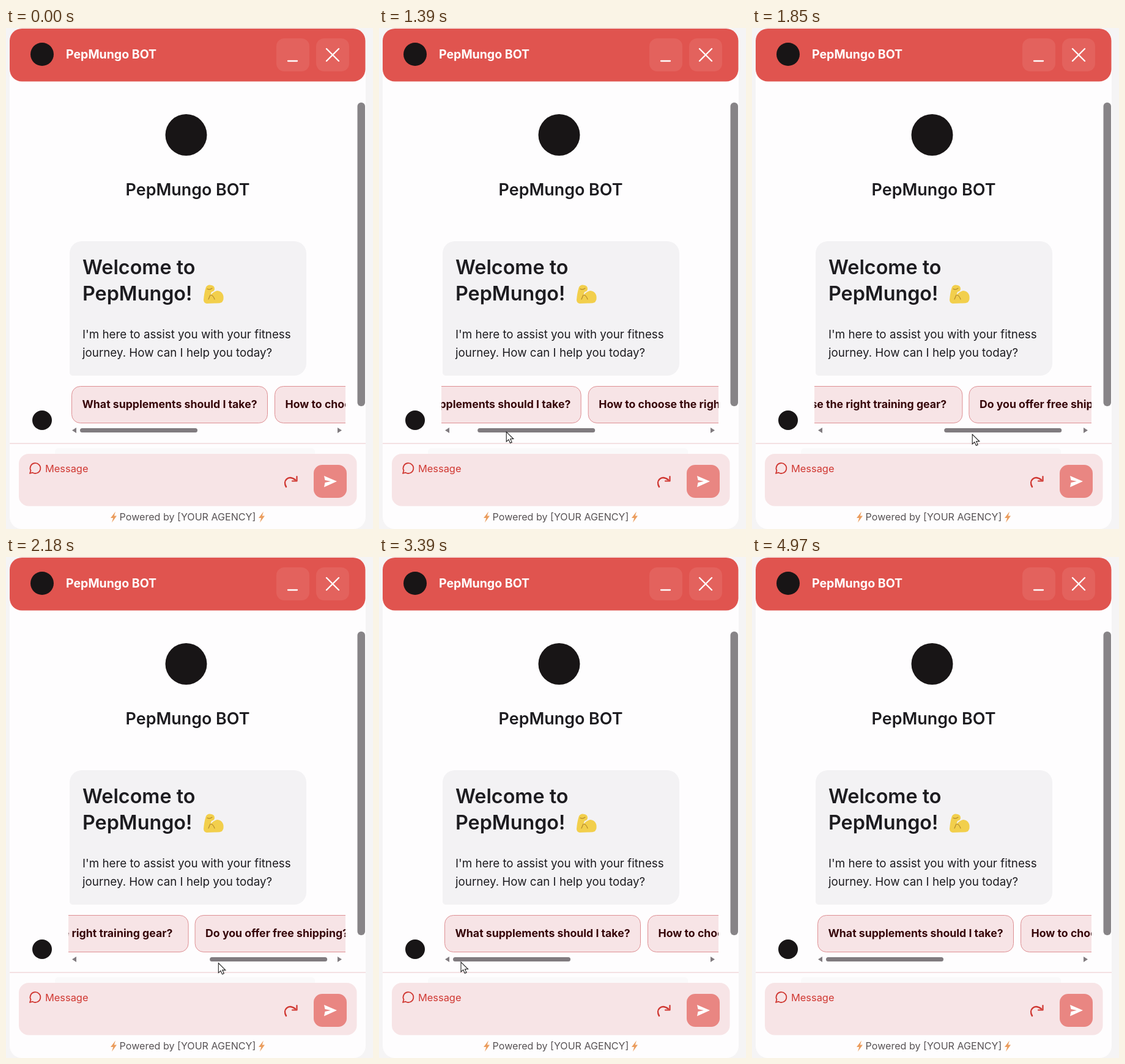
Write an HTML page that moves like this. It is 600 px wide and 820 px high and loops after 5000 ms.

```html
<!DOCTYPE html>
<html lang="en">
<head>
<meta charset="utf-8">
<title>Fitness chat widget</title>
<style>
  html, body { margin: 0; width: 100%; height: 100%; overflow: hidden; background: #f5f4f5; }
  svg { display: block; width: 600px; height: 820px; }
  text { font-family: Inter, "Open Sans", sans-serif; font-optical-sizing: none; fill: #1d1c20; }
  .bold { font-weight: 600; }
  .h1 { font-size: 32.3px; }
  .body { font-size: 18.77px; }
  .chip rect { fill: #f7e4e6; stroke: #de8f93; }
  .chip text { font-size: 17.7px; font-weight: 700; fill: #360609; }
  .line { fill: none; stroke-linecap: round; stroke-linejoin: round; }
  .red { stroke: #d03832; }
  .bar { fill: #807b7f; }
</style>
</head>
<body>
<svg viewBox="0 0 600 820">
  <defs>
    <clipPath id="view"><rect x="102" y="580" width="453" height="72"/></clipPath>
    <path id="bolt" d="M3 -9L-5 1.500H-.8L-3 9L5 -2H.8Z" fill="#eb9d5e"/>
  </defs>

  <rect x="6" y="1" width="582" height="819" rx="20" fill="#fefdfe"/>

  <!-- header -->
  <rect x="6" y="1" width="581.500" height="86.500" rx="20" fill="#e0544f"/>
  <circle cx="59" cy="43" r="19" fill="#181516"/>
  <text x="98" y="50" font-size="19.500" font-weight="700" style="fill:#fff">PepMungo BOT</text>
  <g fill="#e3625d">
    <rect x="442" y="17" width="54" height="54" rx="13"/>
    <rect x="507" y="17" width="54" height="54" rx="13"/>
  </g>
  <path class="line" d="M461 54H476M524 34L544 54M544 34L524 54" stroke="#fff" stroke-width="2.300"/>

  <!-- intro -->
  <circle cx="294.500" cy="175" r="34" fill="#181516"/>
  <text class="bold" x="297" y="274" font-size="26.900" text-anchor="middle">PepMungo BOT</text>
  <rect class="bar" x="574.500" y="122" width="12.500" height="497" rx="6" style="fill:#878487"/>

  <!-- welcome bubble -->
  <path d="M124 349H471A20 20 0 0 1 491 369V549A20 20 0 0 1 471 569H109A5 5 0 0 1 104 564V369A20 20 0 0 1 124 349Z" fill="#f3f2f4"/>
  <text class="bold h1" x="125" y="403">Welcome to</text>
  <text class="bold h1" x="125" y="446">PepMungo!</text>
  <path d="M327 424Q330 419 336 421Q341 422 341 427Q341 431 336 432L334 438Q338 432 345 430Q352 430 355 437Q357 444 353 449Q349 451 341 450.500L328 451Q323 450 323 445Q324 433 327 424Z" fill="#f2cf4c"/>
  <path class="line" d="M329 427Q333 429 337 426M334 437L331 444M335 437Q339 438 341 444" stroke="#b58a2c" stroke-width="1.200"/>
  <text class="body" x="125" y="508">I'm here to assist you with your fitness</text>
  <text class="body" x="125" y="538">journey. How can I help you today?</text>

  <!-- suggestions -->
  <circle cx="59" cy="642" r="16" fill="#181516"/>
  <g clip-path="url(#view)"><g id="chips"></g></g>
  <path class="bar" d="M108 658.500L115 654V663ZM549 658.500L542 654V663Z"/>
  <rect class="bar" id="thumb" x="121" y="655" width="192" height="7" rx="3.500"/>

  <!-- message box -->
  <path d="M6 680H588" stroke="#f0d8da" stroke-width="1.300"/>
  <rect x="80" y="688" width="425" height="12" rx="5" fill="#faf9fa"/>
  <rect x="21" y="697" width="552.500" height="85.500" rx="16" fill="#f7e4e6"/>
  <path class="line red" d="M39 729L40.500 724.500A8.400 8.400 0 1 1 43.500 727.700Z" stroke-width="1.800"/>
  <text x="64" y="727" font-size="16.400" style="fill:#d03832">Message</text>
  <path class="line red" d="M458 751C452 741 461 731 473 739.500" stroke-width="2.500"/>
  <path class="line red" d="M475.500 734V741.500H468" stroke-width="2.200"/>
  <rect x="503" y="715" width="54" height="54" rx="14" fill="#e98682"/>
  <path d="M520 733L541 742L520 751.500L521.500 744L531 742L521.500 740Z" fill="#fff"/>
  <use href="#bolt" x="176" y="800.500"/>
  <use href="#bolt" x="418" y="800.500"/>
  <text x="297" y="806" font-size="16.100" text-anchor="middle" style="fill:#585355">Powered by [YOUR AGENCY]</text>

  <path id="cursor" d="M0 0V16L3.700 12.600L6.200 18.300L9 17.100L6.500 11.500H11.500Z" fill="#fff" stroke="#222" stroke-width="1.100"/>
</svg>
<script>
const LOOP = 5000, SCROLL_RATIO = 2.42;
const $ = id => document.getElementById(id);

// left edge, width, label
$('chips').innerHTML = [
  [107.5, 320, 'What supplements should I take?'],
  [439.5, 372, 'How to choose the right training gear?'],
  [822.5, 270, 'Do you offer free shipping?']
].map(([x, w, label]) => `<g class="chip">
  <rect x="${x}" y="586.5" width="${w}" height="60" rx="14"/>
  <text x="${x + 17}" y="622">${label}</text></g>`).join('');

// [time, value] points
const thumbX = [[1120, 0], [1390, 40], [1850, 193], [2030, 223], [2130, 223], [2420, 58], [2640, 0]];
const cursorX = [[120, 185], [450, 152], [1090, 152], [1390, 208], [1850, 360], [2050, 388], [2420, 208], [2670, 134], [3850, 134], [4150, 118]];
const cursorY = [[120, 830], [450, 653], [1090, 653], [1390, 661], [1850, 665], [2420, 664], [2670, 663], [3850, 663], [4150, 830]];

// Smooth curve through the points, without overshoot
function curve(points, t) {
  const last = points.length - 1;
  if (t <= points[0][0]) return points[0][1];
  if (t >= points[last][0]) return points[last][1];
  const slope = i => (points[i + 1][1] - points[i][1]) / (points[i + 1][0] - points[i][0]);
  const tangent = i => {
    if (i === 0 || i === last) return 0;
    const a = slope(i - 1), b = slope(i);
    return a * b > 0 ? 2 * a * b / (a + b) : 0;
  };
  const i = points.findIndex(p => p[0] > t) - 1;
  const [t0, v0] = points[i], [t1, v1] = points[i + 1];
  const d = t1 - t0, u = (t - t0) / d, w = 1 - u;
  return v0 * w * w * (1 + 2 * u) + v1 * u * u * (3 - 2 * u)
    + d * u * w * (tangent(i) * w - tangent(i + 1) * u);
}

function draw(now) {
  const t = now % LOOP;
  const shift = curve(thumbX, t);
  $('thumb').setAttribute('x', 121 + shift);
  $('chips').setAttribute('transform', `translate(${-shift * SCROLL_RATIO} 0)`);
  $('cursor').setAttribute('transform', `translate(${curve(cursorX, t)} ${curve(cursorY, t)})`);
}

const start = performance.now();
function tick() {
  draw(performance.now() - start);
  requestAnimationFrame(tick);
}
tick();
</script>
</body>
</html>
```
